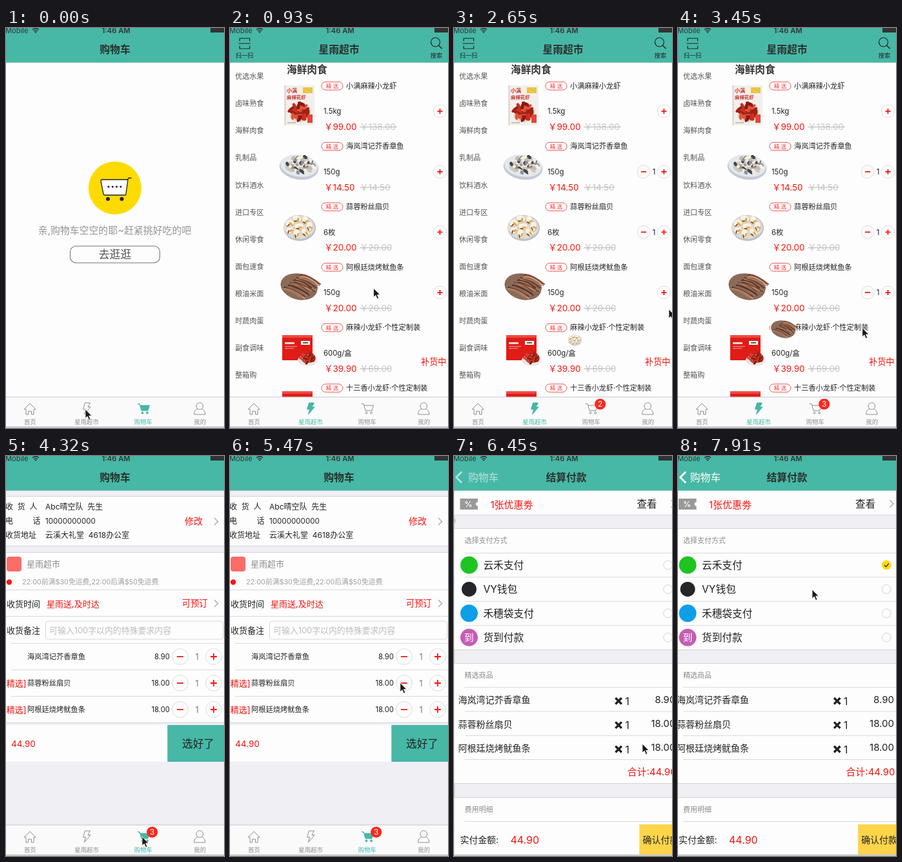
These frames come from a looping animation (338x620 px, 8000 ms). An HTML page:

```html
<!DOCTYPE html>
<html lang="zh-CN">
<head>
<meta charset="utf-8">
<title>购物车</title>
<style>
html, body { margin: 0; width: 100%; height: 100%; overflow: hidden; background: #fdfdfd; }
svg { display: block; width: 338px; height: 620px; }
text { font-family: Inter, "Noto Sans CJK SC", "Noto Sans CJK", sans-serif; white-space: pre; }
.tab { --line: #8e8e8e; --fill: none; }
.tab.on { --line: #47b8a6; --fill: #47b8a6; }
.tab path, .tab circle { stroke: var(--line); fill: var(--fill); stroke-width: 1; stroke-linejoin: round; }
.tab text { fill: var(--line); }
</style>
</head>
<body>
<svg id="stage" viewBox="0 0 338 620" xmlns="http://www.w3.org/2000/svg"></svg>
<script>
const TEAL = '#47b8a6', RED = '#f5150f', INK = '#222', GRAY = '#8c8c8c', YELLOW = '#fedb00', BACK = '#efeff4';

// ---- drawing helpers: text is placed by its vertical centre ----
const text = (x, y, size, str, fill = INK, extra = '') =>
  `<text x="${x}" y="${y + size * 0.37}" font-size="${size}" fill="${fill}" ${extra}>${str}</text>`;
const MID = 'text-anchor="middle" ', END = 'text-anchor="end"', BOLD = 'font-weight="600"';
const rect = (x, y, w, h, fill, extra = '') => `<rect x="${x}" y="${y}" width="${w}" height="${h}" fill="${fill}" ${extra}/>`;
const circle = (x, y, r, fill, extra = '') => `<circle cx="${x}" cy="${y}" r="${r}" fill="${fill}" ${extra}/>`;
const oval = (x, y, rx, ry, fill, turn = 0) =>
  `<ellipse cx="${x}" cy="${y}" rx="${rx}" ry="${ry}" fill="${fill}" transform="rotate(${turn} ${x} ${y})"/>`;
const path = (d, stroke, width = 1, fill = 'none', extra = '') =>
  `<path d="${d}" stroke="${stroke}" stroke-width="${width}" fill="${fill}" ${extra}/>`;
const rule = (y, x = 0, color = '#d9d9de') => rect(x, y, 360 - x, 1, color);
const block = (y, h) => rect(-8, y, 368, h, '#fdfdfd') + rule(y, -8, '#d4d4d9') + rule(y + h - 1, -8, '#d4d4d9');
const chevron = (x, y) => path(`M${x} ${y - 5}l5.5 5.5l-5.5 5.5`, '#a5a5a5', 1.3);
const group = (id, body, attrs = '') => `<g id="${id}" ${attrs}>${body}</g>`;
const step = (x, y, r, plus) => {
  const a = r * 0.4;
  return circle(x, y, r, '#fdfdfd', 'stroke="#dcdcdc"') +
    path(`M${x - a} ${y}h${2 * a}` + (plus ? `M${x} ${y - a}v${2 * a}` : ''), RED, 1.8);
};
const many = (n, f) => Array.from({ length: n }, (_, i) => f(i)).join('');
const rnd = n => { const v = Math.sin(n * 91.7 + 3.1) * 4375.5; return v - Math.floor(v); };

// bits of food strewn over an oval area
const scatter = (n, x, y, rx, ry, size, colors) => many(n, i => {
  const a = i * 2.4, d = Math.sqrt((i + 0.5) / n);
  return oval(x + Math.cos(a) * d * rx, y + Math.sin(a) * d * ry, size * (0.6 + rnd(i) * 0.6), size * 0.45, colors[i % colors.length], rnd(i + 40) * 180);
});

// ---- dishes, centred on 0,0 ----
const redBox = rect(-26, -20, 47, 39, '#df1c16') + rect(-26, -20, 47, 4, '#ee4a42') +
  rect(-22, -9, 15, 3, '#f8d5d0') + rect(3, -11, 14, 6, '#fff') + rect(6, -9, 8, 2, '#555') +
  rect(-22, -3, 19, 1.2, '#f08c84') + rect(-22, 0, 14, 1.2, '#f08c84') +
  oval(13, 19, 15, 9, '#e9e7e7') + scatter(22, 13, 16, 11, 7, 4, ['#b3261a', '#8a1b12', '#d2452f']);
const dishes = [
  rect(-23, -31, 47, 62, '#f3efea', 'rx="1"') + rect(-23, -31, 3, 62, '#e2dcd4') + rect(6, -28, 15, 9, '#e9c544') +
    text(-19, -23, 8, '小满', '#c8302a', BOLD) + text(-19, -13, 7.4, '麻辣花虾', '#c8302a', BOLD) +
    oval(2, 13, 17, 13, '#e6d9d2', -20) + scatter(26, 1, 10, 14, 13, 6, ['#c9301f', '#a32016', '#dd5638', '#8c1a12']) +
    rect(-18, 26, 13, 1.5, '#b9aea2') + rect(13, 14, 8, 13, '#d84a40'),
  oval(0, 2, 30.5, 19, '#c3c9d6', 8) + oval(0, 0, 29, 16.5, '#e3e7ee', 8) +
    scatter(46, 2, -2, 22, 13, 5.5, ['#f4f1ea', '#d3c6b6', '#41464b', '#eeeae2', '#8d9296', '#c9bba8']),
  oval(1, 2, 25, 20, '#b9bfcd') + oval(0, 1, 24, 18, '#dedfe4') +
    many(8, i => {
      const a = i * 0.9, k = i ? 1 : 0, x = Math.cos(a) * 16 * k, y = Math.sin(a) * 12 * k;
      return oval(x, y, 8, 6, '#d9c19a', i * 40) + oval(x, y - 0.8, 7, 5, '#f8f1e2', i * 40) +
        oval(x + 2, y + 1, 3.4, 1.6, '#e3a94a', i * 55) + oval(x - 2, y + 3, 3, 1, '#5b5148', i * 35);
    }),
  oval(0, 1, 29, 20, '#8b6a5a', 14) +
    many(20, i => path(`M${-27 + i * 1.5 + rnd(i) * 5} ${4 - i * 1.25 + rnd(i + 7) * 4}q12 ${-1 + i % 3 * 2} ${26 + rnd(i + 3) * 6} ${12 + i % 4}`,
      ['#6b3c2a', '#a9795f', '#54301f', '#c39a82', '#824b34'][i % 5], 2.1, 'none', 'stroke-linecap="round"')),
  redBox, redBox
];

// ---- pages ----
const empty = rect(0, 53, 338, 567, '#fdfdfd') + circle(169, 248, 41, YELLOW) +
  path('M149 235H189L186 257Q186 259 184 259H154Q151 259 151 257L147 237Q147 235 149 235Z', INK, 1.3, '#fff') +
  path('M188 236L190 232.5H194.5', INK, 1.3) +
  many(4, i => circle(159 + i * 6.3, 246, 1.6, INK)) + circle(158, 265, 3, INK) + circle(179.5, 265, 3, INK) +
  text(168.5, 313, 14.9, '亲,购物车空空的耶~赶紧挑好吃的吧', '#949494', MID) +
  rect(99.5, 338, 139, 26, '#fdfdfd', 'rx="9" stroke="#777" stroke-width="1.1"') +
  text(169, 351, 16.8, '去逛逛', '#555', MID);

const PITCH = 93.65;
const goods = [
  ['小满麻辣小龙虾', '1.5kg', '99.00', '138.00'],
  ['海岚湾记芥香章鱼', '150g', '14.50', '14.50'],
  ['蒜蓉粉丝扇贝', '6枚', '20.00', '20.00'],
  ['阿根廷烧烤鱿鱼条', '150g', '20.00', '20.00'],
  ['麻辣小龙虾·个性定制装', '600g/盒', '39.90', '69.00'],
  ['十三香小龙虾·个性定制装', '600g/盒', '39.90', '69.00']
];
const dishY = [120, 214, 308, 400, 496, 583];
const kinds = '优选水果 卤味熟食 海鲜肉食 乳制品 饮料酒水 进口专区 休闲零食 面包速食 粮油米面 时蔬肉蛋 副食调味 整箱购'.split(' ');

const goodsRow = ([name, size, price, old], i) => {
  const y = 89.6 + i * PITCH, w = old.length > 5 ? 58 : 48;
  return `<use href="#dish${i}" x="107" y="${dishY[i]}"/>` +
    rect(142, y - 6, 33, 12.5, 'none', 'rx="6.2" stroke="#f0554f"') + text(158.5, y + 0.3, 8.3, '精 选', '#ee3a34', MID) +
    text(180, y, 11.2, name) + text(145, y + 39.5, 11.3, size) +
    text(146, y + 63.5, 13.5, '￥' + price, RED) + text(201, y + 63.5, 13.5, '￥' + old, '#c6c6c6') +
    rect(201, y + 63.3, w, 1, '#b5b5b5') +
    (i < 4 ? step(325.5, y + 39.5, 10, true) : text(296, y + 53, 13.2, '补货中', RED)) +
    (i > 0 && i < 4 ? group('less' + i, step(294, y + 39.5, 10) + text(310, y + 39.5, 11.5, '1', INK, MID)) : '');
};
const market = rect(0, 53, 338, 567, '#fdfdfd') +
  kinds.map((k, i) => text(8, 75 + i * 42.1, 11.1, k, '#555')).join('') +
  text(88, 64.5, 15.7, '海鲜肉食', '#333', BOLD) + goods.map(goodsRow).join('');

const order = [[goods[1][0], '8.90'], [goods[2][0], '18.00'], [goods[3][0], '18.00']];
const cart = rect(0, 53, 460, 567, BACK) + block(62, 78) +
  text(-1, 79, 12, '收  货  人') + text(-1, 101, 12, '电         话') + text(-1, 122.5, 12, '收货地址') +
  text(61, 79, 12, 'Abc晴空队  先生') + text(61, 101, 11.6, '10000000000') + text(61, 122.5, 12, '云溪大礼堂  4618办公室') +
  text(277, 101, 14, '修改', RED) + chevron(323, 101) +
  block(149, 265) + rect(1, 156, 23, 23, '#f96e66', 'rx="4"') + text(32, 167, 13, '星雨超市', GRAY) +
  circle(5, 195.5, 4.2, RED) + text(25, 195.5, 10.8, '22:00前满$30免运费,22:00后满$50免运费', '#a0a0a0') +
  rule(207) + text(1, 229, 13, '收货时间') + text(63, 229, 13, '星雨送,及时达', RED) + text(273, 228.5, 13.2, '可预订', RED) + chevron(323, 228) +
  rule(248) + text(1, 270, 13, '收货备注') +
  rect(61.5, 256, 275, 28, '#fdfdfd', 'rx="4" stroke="#d8d8d8"') + text(67, 270, 12.9, '可输入100字以内的特殊要求内容', '#bdbdc2') +
  order.map(([name, price], i) => {
    const y = 311 + i * 41;
    return rule(y - 21, 8) + (i ? text(-4, y, 13, '[精选]', RED) : '') + text(33, y, 11.25, name) +
      text(254, y, 11.3, price, INK, END) + step(270, y, 12.3) + text(296, y, 12.5, '1', '#777', MID) + step(322, y, 12.3, true);
  }).join('') +
  rect(0, 417, 460, 57, '#fdfdfd') + text(8, 446, 13.6, '44.90', RED) +
  rect(250.3, 417, 210, 57, TEAL) + text(298, 446, 16.7, '选好了', INK, MID);

const pays = [['云禾支付', '#1fc423'], ['VY钱包', '#26262a'], ['禾穗袋支付', '#0e9fe8'], ['货到付款', '#c55cb4']];
const checkout = rect(-15, 53, 8, 567, 'url(#shade)') + rect(-7, 53, 367, 567, BACK) + block(52, 40) +
  path('M1 66H28.5V71.5A3 3 0 0 0 28.5 77.5V83H1Z', '#999', 0, '#999') + text(14, 74.5, 12, '%', '#fff', MID + BOLD) +
  text(48, 75, 15, '1张优惠劵', RED) + text(275, 74, 15.5, '查看') + chevron(328.5, 73.5) +
  block(112, 189) + text(8, 131, 11, '选择支付方式', GRAY) +
  pays.map(([name, color], i) => {
    const y = 169 + i * 37.4;
    return rule(y - 19, 8) + circle(15, y, i === 1 ? 11.5 : 13.5, color) + (i === 3 ? text(15, y, 15, '到', '#fff', MID) : '') +
      text(37, y, 15.7, name) + circle(323.3, y, 6.8, '#fdfdfd', 'stroke="#d2d2d2"');
  }).join('') +
  group('picked', circle(323.3, 169, 7.2, YELLOW) + path('M320 169l2.5 2.8l4.3-5.3', INK, 1.2)) +
  block(321, 187) + text(8, 340, 11, '精选商品', GRAY) +
  order.map(([name, price], i) => {
    const y = 378 + i * 37.4;
    return rule(y - 20, 8) + text(-2, y, 14, name) + path(`M242 ${y - 3}l9.5 9.5m0-9.5l-9.5 9.5`, INK, 3.4) +
      text(257, y + 2, 15.5, '1') + text(335, y - 1, 15, price, INK, END);
  }).join('') +
  rule(470, 8) + text(336.5, 489, 15, '合计:44.90', RED, END) +
  block(529, 95) + text(8, 548, 11, '费用明细', GRAY) + rule(566, 8) +
  text(1, 595, 13.9, '实付金额:') + text(79, 595, 16, '44.90', RED) +
  rect(279, 571, 81, 47, '#fed549') + text(284, 595, 14, '确认付款');

// ---- bars ----
const icons = [
  '<path d="M28 591L37 582L46 591H43V599H39.5V594H34.5V599H31V591Z" style="fill:none"/>',
  '<path d="M122.5 581H130.5L127 587.5H131L121.5 599L123.5 591H119.5Z"/>',
  '<path d="M204 582.5H207L210 593H220L222.5 585H208"/><circle cx="211.5" cy="596.5" r="1.5"/><circle cx="219" cy="596.5" r="1.5"/>',
  '<path d="M297 590.5Q292 592 291.5 599H309Q308.5 592 303.5 590.5" style="fill:none"/><circle cx="300.3" cy="586" r="5.3"/>'
];
const tabs = rect(0, 572, 460, 48, '#fafafb') + rule(571.5, 0, '#c6c6d2') +
  ['首页', '星雨超市', '购物车', '我的'].map((name, i) =>
    group('tab' + i, icons[i] + text(37.3 + i * 87.8, 611, 9.4, name, '', MID), 'class="tab"')).join('') +
  group('badge', circle(226.7, 583, 8.6, '#f9281f') + text(226.7, 583, 11.8, '1', '#fff', MID + 'id="badgeNum"'));

const wifi = path('M41 2.8Q46 -1.5 51 2.8M43 5Q46 2.4 49 5', '#333', 1.5) + circle(46, 6.6, 1.2, '#333');
const title = (id, str) => text(169, 33, 15.8, str, '#2b2f2e', `id="${id}" ${MID}${BOLD}`);
const nav = rect(0, 0, 338, 53, TEAL) + rect(0, 53, 338, 0.6, '#3f9f91') +
  title('cartTitle', '购物车') + title('marketTitle', '星雨超市') + title('payTitle', '结算付款') +
  group('back', path('M12 24.5L3.5 33L12 41.5', '#fff', 2.6) + text(42.5, 33, 15.8, '购物车', '#fff', MID + 'id="backLabel"')) +
  group('tools', path('M15 20.5V16H30.5V20.5M15 27.5V32H30.5V27.5M13.5 24H32', INK, 1.2) +
    circle(318.5, 22, 7, 'none', `stroke="${INK}" stroke-width="1.2"`) + path('M323.5 27L328.5 32', INK, 1.4) +
    text(22.5, 42.5, 9.2, '扫一扫', INK, MID) + text(320, 42.5, 9.2, '搜索', INK, MID)) +
  text(-1, 3.6, 11.2, 'Mobile', '#333') + wifi + text(170.5, 3.4, 11.2, '1:46 AM', '#333', MID + BOLD) + rect(317, 0, 21, 7, '#333');

const pointer = '<path id="pointer" d="M0 0V14L3.2 11L5.6 16.5L8 15.4L5.6 10.2H10Z" fill="#1a1a1a" stroke="#fff" stroke-width="0.8"/>';

const stage = document.getElementById('stage');
stage.innerHTML =
  '<defs><linearGradient id="shade"><stop stop-color="#000" stop-opacity="0"/><stop offset="1" stop-color="#000" stop-opacity=".2"/></linearGradient>' +
  dishes.map((d, i) => group('dish' + i, d)).join('') + '</defs>' +
  group('empty', empty) + group('market', market) + group('cart', cart) + group('tabs', tabs) + group('checkout', checkout) + nav +
  rect(0, 617.5, 338, 3, '#c9c9c9') +
  many(3, i => group('fly' + i, rect(-30.5, -32, 61, 64, '#fdfdfd') + `<use href="#dish${i + 1}"/>`)) + pointer;

// ---- timing ----
const LOOP = 8000;
// [start, equal beats until the next start]
const beats = [[0, 1], [470, 8], [1620, 1], [1790, 1], [1900, 5], [2650, 1], [2760, 7], [3740, 1], [3910, 3], [4320, 1], [4440, 3],
  [4900, 1], [5010, 7], [6050, 1], [6170, 1], [6280, 1], [6450, 1], [6570, 4], [7150, 1], [7330, 1], [7440, 1], [7730, 1], [7910, 1]];
const ticks = beats.flatMap(([at, n], i) => {
  const next = i + 1 < beats.length ? beats[i + 1][0] : LOOP;
  return Array.from({ length: n }, (_, k) => at + (next - at) * k / n);
});
const snap = t => { let s = 0; for (const k of ticks) if (k <= t + 0.01) s = k; return s; };

const toMarket = 470, toCart = 3910, toPay = 6170, pick = 7330;
const adds = [1620, 2050, 2900], FLY = 795;
const trail = [[0, 123, 591], [600, 123, 591], [1200, 321, 218], [1620, 321, 219], [1790, 322, 312], [2080, 322, 312], [2650, 333, 436],
  [2900, 321, 405], [3060, 321, 405], [3740, 213, 588], [3910, 211, 590], [5010, 211, 590], [5400, 262, 345], [5750, 289, 440],
  [6170, 290, 442], [6450, 292, 446], [7150, 321, 170], [7330, 321, 170], [7440, 222, 172], [7730, 214, 190], [7910, 208, 207]];

const el = id => document.getElementById(id);
const show = (id, on) => { el(id).style.display = on ? '' : 'none'; };
const move = (id, x, y = 0, k = 1) => el(id).setAttribute('transform', `translate(${x} ${y}) scale(${k})`);
const fade = (id, a) => { el(id).style.opacity = a; };

function along(t) {
  const i = trail.findIndex(p => p[0] > t);
  if (i < 0) return trail[trail.length - 1].slice(1);
  const [a, ax, ay] = trail[i - 1], [b, bx, by] = trail[i];
  const p = (t - a) / (b - a), e = p * p * (3 - 2 * p);
  return [ax + (bx - ax) * e, ay + (by - ay) * e];
}

// a dish follows a quadratic curve into the cart while shrinking
function fly(i, t) {
  const p = (t - adds[i]) / FLY, on = p >= 0 && p < 1;
  show('fly' + i, on);
  if (!on) return;
  const y0 = dishY[i + 1], bend = 2 * p * (1 - p);
  const x = 107 + 106 * (bend * 0.5 + p * p), y = y0 + (590 - y0) * (bend * 0.14 + p * p);
  move('fly' + i, x, y, Math.min(1, 1 - (p - 0.215) * 1.07));
}

function draw(t) {
  const inMarket = t >= toMarket && t < toCart, inPay = t >= toPay;
  show('empty', t < toMarket);
  show('market', inMarket);
  show('tools', inMarket);
  show('marketTitle', inMarket);
  show('cart', t >= toCart);
  show('cartTitle', !inMarket);
  el('tab1').classList.toggle('on', inMarket);
  el('tab2').classList.toggle('on', !inMarket);

  const count = adds.filter(a => t >= a).length;
  show('badge', count > 0);
  el('badgeNum').textContent = count;
  adds.forEach((a, i) => { show('less' + (i + 1), t >= a); fly(i, t); });

  // push transition: critically damped spring
  const s = 18.5 * (t - toPay + 23) / 1000;
  const left = inPay ? (1 + s) * Math.exp(-s) : 1, gone = 1 - left;
  for (const id of ['cart', 'tabs', 'cartTitle']) move(id, -127 * gone);
  move('checkout', 345 * left);
  move('payTitle', 207 * left);
  move('backLabel', 127 * left);
  show('checkout', inPay);
  show('payTitle', inPay);
  show('back', inPay);
  fade('cartTitle', Math.max(0, 1 - gone * 1.1));
  fade('payTitle', gone);
  fade('back', Math.max(0, 1 - left * 16));
  show('picked', t >= pick);
  move('pointer', ...along(t));
}

const begin = performance.now();
function loop(now) {
  draw(snap(Math.max(0, now - begin) % LOOP));
  requestAnimationFrame(loop);
}
draw(0);
requestAnimationFrame(loop);
</script>
</body>
</html>
```
